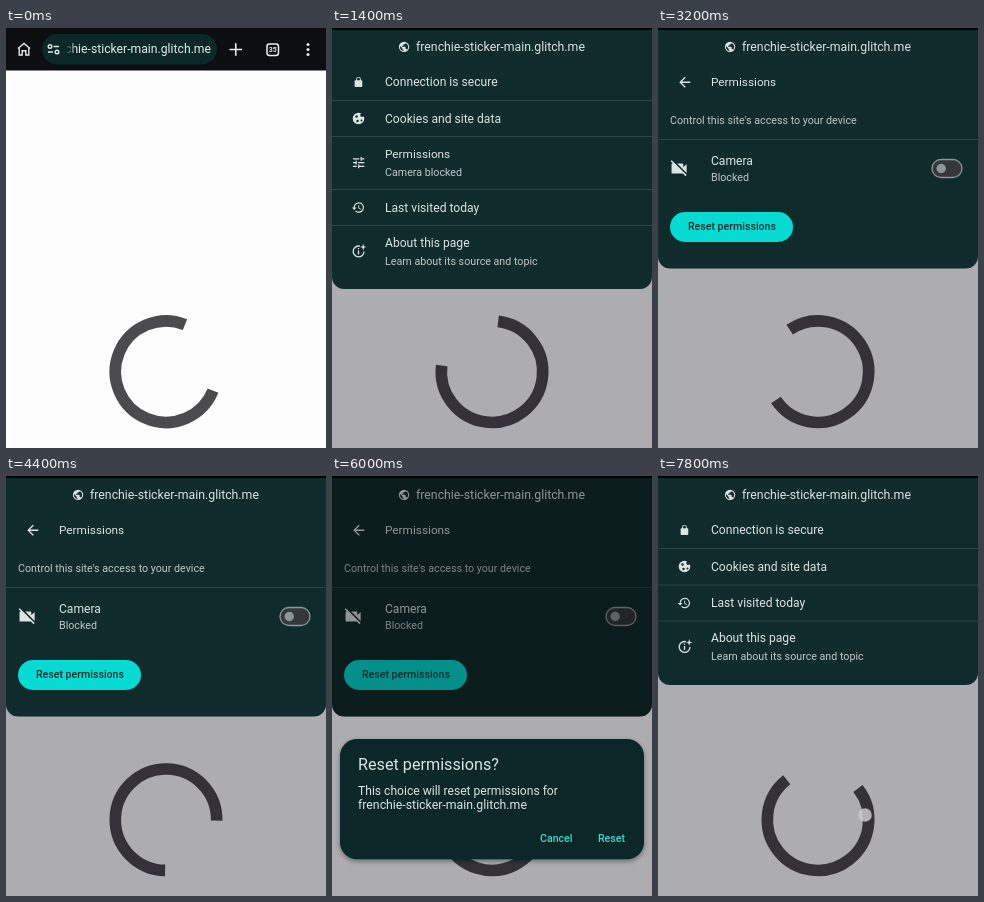
Recreate the animation shown at these times as an HTML page. Size 320 px wide and 420 px high, loop 8000 ms.

```html
<!DOCTYPE html>
<html lang="en">
<head>
<meta charset="utf-8">
<title>Resetting site permissions</title>
<style>
  html, body { margin: 0; width: 100%; height: 100%; overflow: hidden; background: #fdfdfd; }
  svg { display: block; width: 320px; height: 420px; }
  text { font: 12.1px Roboto, sans-serif; fill: #dbe5e3; }
  .small { font-size: 10.7px; fill: #bdc9c7; }
  .url { font-size: 12.3px; }
  .action { font-size: 10.6px; font-weight: 500; fill: #3fd8d0; }
  .panel { fill: #0f2b2b; }
  .line { stroke: #2a4343; }
  .icon { fill: #dbe5e3; }
  .oval { fill: none; stroke: #fa2a0c; }
  .raised { filter: drop-shadow(0 2px 2.5px rgba(0, 0, 0, .4)); }
</style>
</head>
<body>
<svg viewBox="0 0 320 420">
  <defs>
    <path id="tune" d="M3 17v2h6v-2zM3 5v2h10V5zm10 16v-2h8v-2h-8v-2h-2v6zM7 9v2H3v2h4v2h2V9zm14 4v-2H11v2zm-6-4h2V7h4V5h-4V3h-2z"/>
    <linearGradient id="urlFade" gradientUnits="userSpaceOnUse" x1="60" x2="70" y1="0" y2="0">
      <stop stop-color="#dbe5e3" stop-opacity="0.1"/><stop offset="1" stop-color="#e4ecea"/>
    </linearGradient>
    <linearGradient id="ripple">
      <stop stop-color="#3a9f9a"/><stop offset="0.6" stop-color="#8fc6c1"/><stop offset="1" stop-color="#62a9a4"/>
    </linearGradient>
    <clipPath id="urlClip"><rect x="61" y="6" width="150" height="30"/></clipPath>
    <g id="header">
      <path class="icon" transform="translate(65.8 12.6) scale(.52)" d="M12 2a10 10 0 1 0 0 20 10 10 0 0 0 0-20zm-1 17.9A8 8 0 0 1 4.2 10.2L9 15v1a2 2 0 0 0 2 2zm6.9-2.5A2 2 0 0 0 16 16h-1v-3a1 1 0 0 0-1-1H8v-2h2a1 1 0 0 0 1-1V7h2a2 2 0 0 0 2-2v-.4a8 8 0 0 1 2.9 12.8z"/>
      <text class="url" x="84" y="22.5">frenchie-sticker-main.glitch.me</text>
    </g>
  </defs>

  <rect id="page" width="320" height="420"/>
  <circle id="spinner" r="50.7" fill="none" stroke="#4b4a4d" stroke-width="11.6" pathLength="360" stroke-dasharray="270 90"/>

  <g id="toolbar">
    <rect width="320" height="42.5" fill="#0c0e12"/>
    <path d="M12 20.5 18 15.5 24 20.5M13.2 19.8V27H16.2V22.8H19.8V27H22.8V19.8" fill="none" stroke="#e6e8e8" stroke-width="1.4"/>
    <rect x="36" y="6" width="175" height="30.5" rx="15.2" fill="#0a2827"/>
    <g fill="none" stroke="#dbe5e3" stroke-width="1.4">
      <circle cx="44" cy="18.5" r="1.8"/><path d="M47.5 18.5H53M42 24H47"/><circle cx="51" cy="24" r="1.8"/>
    </g>
    <g clip-path="url(#urlClip)"><text x="205" y="25.3" text-anchor="end" style="font-size:12.2px;fill:url(#urlFade)">frenchie-sticker-main.glitch.me</text></g>
    <path d="M223.5 21.5h12.5M229.75 15.2v12.5" stroke="#eceeee" stroke-width="1.6"/>
    <rect x="261" y="16" width="11.5" height="11.5" rx="2.5" fill="none" stroke="#eceeee" stroke-width="1.5"/>
    <text x="266.8" y="24.3" text-anchor="middle" style="font-size:7px;font-weight:700">35</text>
    <g fill="#eceeee"><circle cx="302" cy="16.5" r="1.5"/><circle cx="302" cy="21.5" r="1.5"/><circle cx="302" cy="26.5" r="1.5"/></g>
  </g>

  <rect id="scrim" width="320" height="420" fill="#06000d"/>

  <g id="sitePanel">
    <rect id="siteBack" class="panel" y="-20" width="320" rx="12"/>
    <use href="#header"/>
    <path class="icon" transform="translate(20.7 48.4) scale(.48)" d="M18 8h-1V6A5 5 0 0 0 7 6v2H6a2 2 0 0 0-2 2v10a2 2 0 0 0 2 2h12a2 2 0 0 0 2-2V10a2 2 0 0 0-2-2zM9 8V6a3 3 0 0 1 6 0v2z"/>
    <text x="53" y="58.3">Connection is secure</text>
    <path class="line" d="M0 72.5H320"/>
    <circle class="icon" cx="26.5" cy="90.5" r="5.8"/>
    <g class="panel"><circle cx="24.5" cy="88.5" r="1.2"/><circle cx="25.5" cy="93" r="1.2"/><circle cx="29.5" cy="92.5" r="1"/><circle cx="30.2" cy="87" r="2"/></g>
    <text x="53" y="94.5">Cookies and site data</text>
    <g id="permissionRow">
      <path class="line" d="M0 108.5H320"/>
      <use href="#tune" class="icon" transform="translate(19.1 127) scale(.63)"/>
      <text x="53" y="129.7" style="font-size:11.8px">Permissions</text>
      <text class="small" x="53" y="147.5">Camera blocked</text>
    </g>
    <g id="lowerRows">
      <path class="line" d="M0 161.5H320M0 197.5H320"/>
      <path class="icon" transform="translate(19.3 172.6) scale(.58)" d="M13 3a9 9 0 0 0-9 9H1l4 4 4-4H6a7 7 0 1 1 2.06 4.94l-1.42 1.42A9 9 0 1 0 13 3zm-1 5v5l4.28 2.54.72-1.21-3.5-2.08V8z"/>
      <text x="53" y="183.8">Last visited today</text>
      <path d="M28 218.2A5.4 5.4 0 1 0 32 223.5M26.5 222.5V226.5M26.5 220V221.3" fill="none" stroke="#dbe5e3" stroke-width="1.3"/>
      <path class="icon" d="M31.2 215.6 32 218.2 34.5 219 32 219.8 31.2 222.4 30.4 219.8 28 219 30.4 218.2z"/>
      <text x="53" y="218.7">About this page</text>
      <text class="small" x="53" y="236.7">Learn about its source and topic</text>
    </g>
  </g>

  <g id="permissionPanel">
    <rect class="panel" y="-20" width="320" height="260.5" rx="12"/>
    <use href="#header"/>
    <path class="icon" transform="translate(18.5 46) scale(.69)" d="M20 11H7.83l5.59-5.59L12 4l-8 8 8 8 1.41-1.41L7.83 13H20z"/>
    <text x="53" y="58.1" style="font-size:11.8px">Permissions</text>
    <text class="small" x="12" y="95.7">Control this site's access to your device</text>
    <path class="line" d="M0 111.5H320"/>
    <path class="icon" transform="translate(11 130.5) scale(.84)" d="M21 6.5l-4 4V7a1 1 0 0 0-1-1H9.8L21 17.2zM3.3 2 2 3.3 4.7 6H4a1 1 0 0 0-1 1v10a1 1 0 0 0 1 1h12l.5-.2L19.7 21 21 19.7z"/>
    <text x="53" y="136.8">Camera</text>
    <text class="small" x="53" y="153.3">Blocked</text>
    <rect x="274" y="131.5" width="30" height="18" rx="9" fill="#34383b" stroke="#8c9795" stroke-width="1.3"/>
    <circle cx="283.2" cy="140.5" r="4.7" fill="#8c9795"/>
    <rect x="12" y="184" width="123" height="30" rx="15" fill="#06dbd3"/>
    <rect id="dim" y="-20" width="320" height="260.5" rx="12"/>
    <rect id="pressed" x="12" y="184" width="123" height="30" rx="15" fill="url(#ripple)"/>
    <text class="action" x="30" y="202.3" style="fill:#06302f">Reset permissions</text>
  </g>
  <rect id="topEdge" width="320" height="2"/>

  <g id="dialog">
    <rect class="raised" x="8" y="263" width="304" height="120.3" rx="17" fill="#0b2727"/>
    <text x="26" y="294" style="font-size:16.2px">Reset permissions?</text>
    <text x="26" y="318.6">This choice will reset permissions for</text>
    <text class="url" x="26" y="333.2">frenchie-sticker-main.glitch.me</text>
    <text class="action" x="208" y="366">Cancel</text>
    <text class="action" x="266" y="366">Reset</text>
  </g>

  <ellipse id="permissionOval" class="oval" cx="126" cy="130.2" rx="132.5" ry="33" stroke-width="8.5"/>
  <ellipse id="resetOval" class="oval" cx="75" cy="208.8" rx="111.8" ry="25.3" stroke-width="7"/>
  <circle id="touch" r="6.8" fill="#c9c9cb"/>
</svg>
<script>
const LOOP = 8000, STEP = 200;
const el = id => document.getElementById(id);
const set = (id, name, value) => el(id).setAttribute(name, value);
const show = (id, opacity) => set(id, "opacity", Number(opacity));

// Linear interpolation through [time, value] points, extended past the last one.
function track(points, t) {
  let i = 1;
  while (i < points.length - 1 && t > points[i][0]) i++;
  const [[t0, v0], [t1, v1]] = [points[i - 1], points[i]];
  return v0 + (v1 - v0) * (t - t0) / (t1 - t0);
}

const gapAngle = [[0, -23], [1000, 161], [2200, 374], [3200, 551], [6800, 1196], [7800, 1357]];
const touches = [
  { from: 800, to: 1200, x: 44, y: 20, opacity: 0.65 },
  { from: 5200, to: 5600, x: 107, y: 198.5, opacity: 0.45 },
  { from: 7800, to: 8000, x: 207, y: 339, opacity: 0.85 }
];

function draw(time) {
  const t = Math.floor(time / STEP) * STEP;
  const within = (from, to) => t >= from && t < to;
  const opening = Math.min(1, Math.max(0, (t - 1000) / 400));
  const finished = t >= 7200;

  const tint = t <= 1000 ? t / 1000 : 0;
  set("page", "fill", `rgb(${253 - 9 * tint},${253 - 8 * tint},${253 - 3 * tint})`);
  set("spinner", "transform", `translate(160 343.7) rotate(${track(gapAngle, t) + 45})`);
  show("scrim", 0.32 * opening);
  show("topEdge", opening);

  show("sitePanel", within(1200, 2800) || finished ? opening : 0);
  show("permissionRow", !finished);
  set("lowerRows", "transform", `translate(0 ${finished ? -52.5 : 0})`);
  set("siteBack", "height", finished ? 229 : 281);

  show("permissionPanel", within(2800, 7200));
  show("dim", within(5400, 7000) ? 0.35 : within(7000, 7200) ? 0.17 : 0);
  show("pressed", within(5200, 5600));
  show("dialog", within(5400, 5600) ? 0.88 : within(5600, 7000) ? 1 : within(7000, 7200) ? 0.5 : 0);

  show("permissionOval", within(1800, 2600));
  show("resetOval", within(5000, 5800));

  const touch = touches.find(({ from, to }) => within(from, to));
  show("touch", touch ? touch.opacity : 0);
  if (touch) set("touch", "transform", `translate(${touch.x} ${touch.y})`);
}

function tick() {
  draw(performance.now() % LOOP);
  requestAnimationFrame(tick);
}
tick();
</script>
</body>
</html>
```
